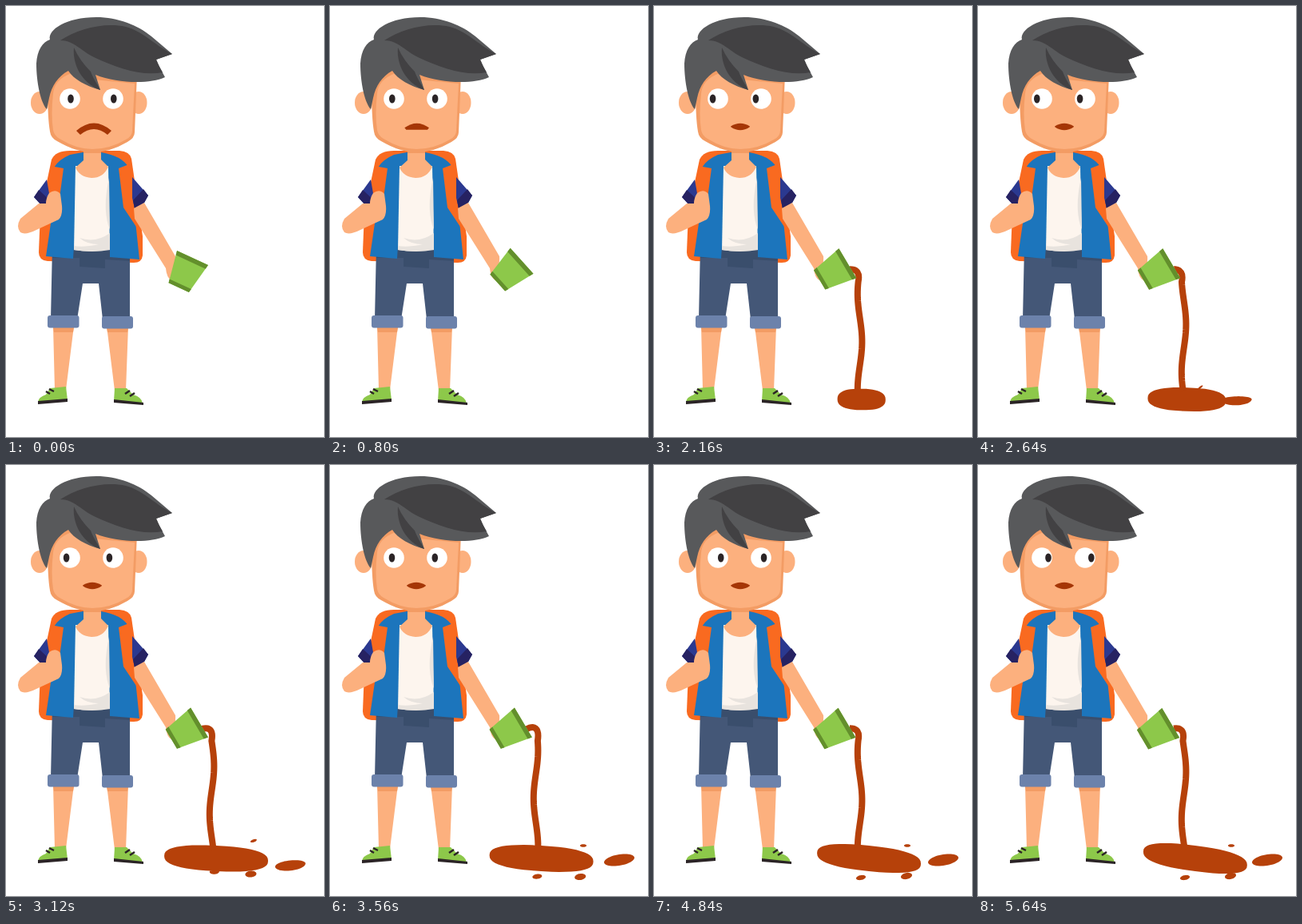
Recreate the animation shown at these times as an HTML page. Size 398 px wide and 539 px high, loop 5680 ms.

```html
<!DOCTYPE html>
<html lang="en">
<head>
<meta charset="utf-8">
<title>Spilled cup</title>
<style>
html, body { margin: 0; width: 100%; height: 100%; overflow: hidden; background: #fff; }
svg { display: block; width: 398px; height: 539px; }
.skin { fill: #fcb07e; } .shade { fill: #f39c64; }
.hair { fill: #58595b; } .dark { fill: #424143; }
.orange { fill: #f96a20; } .blue { fill: #1c75bc; }
.sleeve { fill: #2b3990; } .navy { fill: #262262; }
.jeans { fill: #445777; } .fold { fill: #3a4e6c; } .cuff { fill: #6c82ab; }
.green { fill: #8dc84a; } .rim { fill: #638f2c; } .ink { fill: #2b2426; }
.sauce { fill: #b6410a; }
</style>
</head>
<body>
<svg viewBox="0 0 398 539">
  <!-- backpack, legs, shoes -->
  <path class="orange" d="M57 192Q62 181 80 181H142Q155 182 157 191L171 288V312Q170 321 160 321L52 319Q41 318 41 308L43 258Z"/>
  <path class="skin" d="M59 400H85L75 480H61ZM126 400H153L150 481H136Z"/>
  <path class="shade" d="M59 402H85L84 408H60ZM126 402H153L152 408H127Z"/>
  <path class="green" d="M55 478L75 476L77 493L40 495Q41 489 50 486ZM136 478L151 478L159 486Q170 489 171 497L135 494Z"/>
  <path class="ink" d="M40 494L77 491V495L40 498ZM135 492L172 496V499L135 496Z"/>
  <path d="M50 482L55 485M54 479L60 482M149 485L155 481M155 488L161 484" stroke="#2b2426" stroke-width="2.5" fill="none"/>
  <path class="jeans" d="M58 300L155 300L155 392H121L116 347H96L89 392H56Z"/>
  <path class="fold" d="M58 306H155V319L124 317V328L92 326V315L58 315Z"/>
  <rect class="cuff" x="52" y="387" width="39.500" height="15.500" rx="3"/>
  <rect class="cuff" x="120" y="388" width="39" height="15.500" rx="3"/>
  <!-- torso -->
  <path class="blue" d="M96 183L80 186Q66 192 60 202L57 265L50 313L84 316L85 300H130V314L167 317L161 260L153 201Q144 187 119 183Z"/>
  <path fill="#fdf5ee" d="M87 200H128L130 304Q108 309 85 305Z"/>
  <path fill="#e8e3de" d="M129 215Q120 255 130 280ZM130 284Q112 297 92 290Q101 298 116 298Q98 302 85 300V305Q108 309 130 305Z"/>
  <path class="skin" d="M97 175H119V192L128 201Q122 215 107 215Q92 214 87 202L97 193Z"/>
  <path class="shade" d="M97 178H119V184H97Z"/>
  <path class="orange" d="M57 196L61 201L72 203L67 240L52 240ZM141 203L154 198L170 290L163 276L147 252Z"/>
  <!-- arms -->
  <path class="sleeve" d="M51 217L55 240L47 252L35 239ZM158 214L178 237L173 246L161 253L158 240Z"/>
  <path class="navy" d="M41 230L55 243L47 252L35 239ZM172 229L178 237L173 246L161 254L159 243Z"/>
  <path class="skin" d="M41 247L18 266Q12 276 18 283Q24 287 38 280L66 267Q71 262 70 250L68 235Q62 228 54 234Q50 240 50 247ZM160 253L173 246L212 313Q213 322 207 343Q201 340 200 328L161 266Z"/>
  <!-- head -->
  <ellipse class="skin" cx="42" cy="121" rx="11" ry="14"/>
  <ellipse class="skin" cx="166" cy="121" rx="10.500" ry="14"/>
  <path class="shade" d="M52 100Q52 140 55 157Q56 165 64 169Q88 183 108 183Q130 183 152 170Q161 165 161 158L164 85L70 70Z"/>
  <path class="skin" d="M59 110Q56 135 59 155Q60 162 67 166Q88 179 108 179Q130 179 150 167Q158 163 158 156L161 97L110 92L82 84Q60 92 59 110Z"/>
  <path class="hair" d="M51 129C43 120 38 95 38 72C39 55 46 45 55 42C52 30 75 14 113 14C140 14 165 24 182 38L208 60L188 67C191 74 195 82 199 89C180 98 140 97 112 86L118 105C100 100 85 92 78 81C65 88 57 100 54 115Z"/>
  <path class="dark" d="M68 43C90 29 122 20 150 26C172 32 182 46 208 60L188 67Q191 75 196 83C170 88 140 78 110 64C95 57 85 43 68 43ZM85 52C83 72 94 96 118 105C113 96 109 90 106 82Q92 68 85 52Z"/>
  <circle cx="80" cy="116" r="12.800" fill="#fff"/>
  <circle cx="134" cy="116" r="12.800" fill="#fff"/>
  <g id="pupils" class="ink">
    <ellipse cx="0" cy="116" rx="3.800" ry="5.500"/>
    <ellipse cx="53.800" cy="116" rx="3.800" ry="5.500"/>
  </g>
  <path id="mouth" fill="#a53606"/>
  <!-- spill -->
  <path id="spill" class="sauce"/>
  <path id="stream" fill="none" stroke="#b6410a" stroke-width="8"/>
  <g id="cup">
    <path class="green" d="M-21.500 -20.600H21.500L14 20.300H-14Z"/>
    <path class="rim" d="M-21.500 -20.600H21.500L20.500 -15H-20.500ZM-15 15.500H15L14 20.300H-14Z"/>
  </g>
</svg>
<script>
const LOOP = 5680, STEP = 40;
const TIPPED = 1200, POUR = 950, LAND = 1680, LOOK_BACK = 2360;
const set = (id, attr, value) => document.getElementById(id).setAttribute(attr, value);
const mix = (a, b, k) => a + (b - a) * k;
const part = (t, from, length) => Math.min(Math.max((t - from) / length, 0), 1);
const easeOut = p => 1 - (1 - p) ** 2;

// Drops leave the puddle, slow down and follow a small arc.
const drops = [
  { start: 2440, time: 1000, from: [302, 486], to: [362, 494], size: [19, 7], arc: 10, lean: [0, -.15], top: .5 },
  { start: 2440, time: 1640, from: [288, 496], to: [316, 514], size: [7, 4], arc: 4, lean: [0, -.15], top: 1 },
  { start: 2900, time: 1000, from: [262, 504], to: [259, 516], size: [6, 3], arc: 0, lean: [0, -.15], top: 1 },
  { start: 2480, time: 1000, from: [262, 480], to: [317, 476], size: [4, 1.8], arc: -8, lean: [-.8, 0], top: 1 }
];

// Squarish oval, sheared by lean; top scales its upper half.
function oval(cx, cy, rx, ry, lean, top = 1, power = 1) {
  const bend = v => Math.sign(v) * Math.abs(v) ** power;
  const points = [];
  for (let a = 0; a < 2 * Math.PI; a += Math.PI / 24) {
    const x = rx * bend(Math.cos(a)), y = ry * bend(Math.sin(a));
    points.push(`${cx + x} ${cy + (y < 0 ? y * top : y) + lean * x}`);
  }
  return `M${points.join('L')}Z`;
}

function puddlePath(t) {
  const grow = part(t, LAND, 1440) ** .7;
  const slide = part(t, LAND, LOOP - LAND);
  const depth = Math.min(1, grow * 4) * mix(11, 16, grow);
  return oval(258 + 14 * slide, 492, 65 * grow, depth, .13 * slide, 1, .8);
}

function dropPath(drop, t) {
  const p = part(t, drop.start, drop.time), k = easeOut(p);
  const size = Math.min(1, p * 5);
  return oval(
    mix(drop.from[0], drop.to[0], k),
    mix(drop.from[1], drop.to[1], k) + drop.arc * Math.sin(Math.PI * p) ** 2,
    drop.size[0] * size, drop.size[1] * size,
    mix(...drop.lean, p), mix(drop.top, 1, p));
}

// Spout over the rim, then a column carrying a slow wave.
function streamPath(t) {
  const crest = 445 - .045 * (t - 1600);
  const wave = y => Math.cos(2 * Math.PI * (y - crest) / 120);
  const x = y => 257.6 + 2.8 * wave(y);
  const k = (wave(345) + 1) / 2;
  let d = `M245 ${mix(329, 331, k)}C${mix(254, 256, k)} ${mix(330, 324, k)} ` +
    `${mix(257, 263, k)} ${mix(335, 328, k)} ${x(345)} 345`;
  for (let y = 349; y <= 481; y += 4) d += `L${x(y)} ${y}`;
  return d;
}

// A frown that shrinks into a small open mouth.
function mouthPath(k) {
  const cx = mix(110, 108, k), outer = mix(22, 12, k), inner = mix(17, 11.5, k);
  const high = mix(156, 150.5, k), low = mix(161, 151.5, k);
  return `M${cx - outer} ${high}Q${cx} ${mix(137, 143, k)} ${cx + outer} ${high}` +
    `L${cx + inner} ${low}Q${cx} ${mix(147, 159, k)} ${cx - inner} ${low}Z`;
}

const gaze = t => t < LOOK_BACK
  ? 81 - 8 * (t / LOOK_BACK) ** .85
  : 73 + 15 * part(t, LOOK_BACK, 3280) ** 1.2;

function draw(now) {
  const t = Math.floor(now % LOOP / STEP) * STEP;
  const tip = part(t, 0, TIPPED);
  const drift = part(t, 1600, 4040);
  const poured = part(t, POUR, 750) ** 1.6;

  set('pupils', 'transform', `translate(${gaze(t)})`);
  set('mouth', 'd', mouthPath(tip));
  set('cup', 'transform',
    `translate(${224.8 - 1.3 * drift} ${333.7 - 1.7 * tip + drift}) rotate(${25 + 34.4 * tip})`);
  set('stream', 'd', streamPath(t));
  set('stream', 'stroke-dasharray', `${170 * poured} 999`);
  set('stream', 'visibility', poured ? 'visible' : 'hidden');
  set('spill', 'd', puddlePath(t) + drops.map(drop => dropPath(drop, t)).join(''));
}

let start;
function tick(now) {
  start ??= now;
  draw(now - start);
  requestAnimationFrame(tick);
}
draw(0);
requestAnimationFrame(tick);
</script>
</body>
</html>
```
